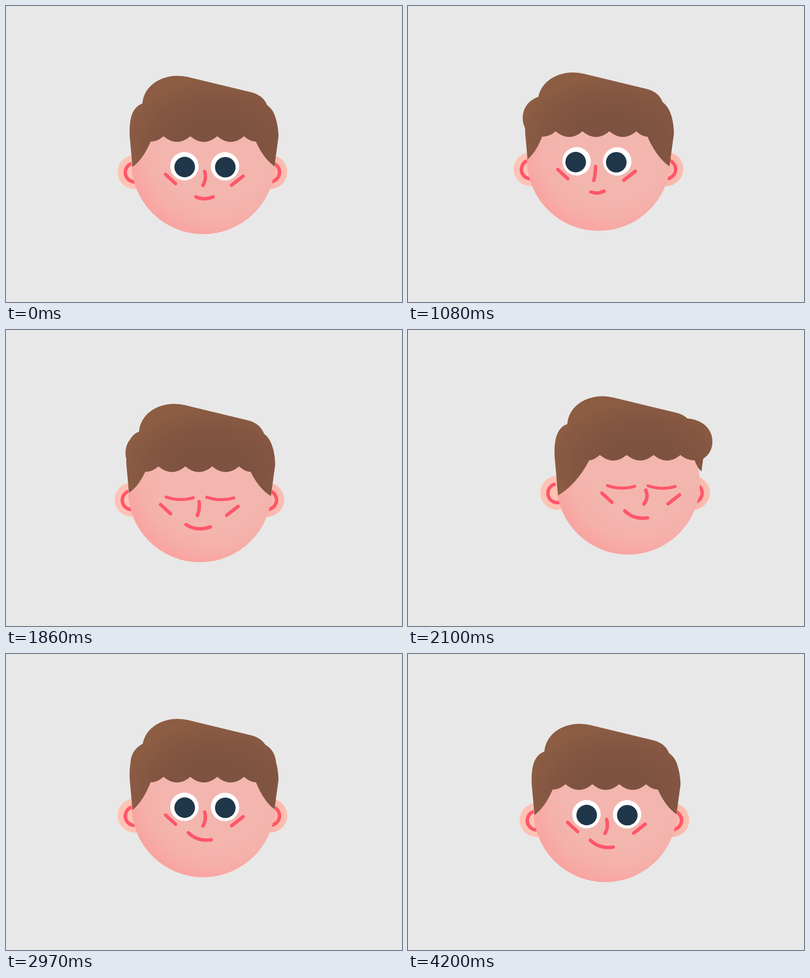
Animation of 800 by 600 pixels, one loop 4230 ms. Source, as an HTML page:

```html
<!DOCTYPE html>
<html lang="en">
<head>
<meta charset="utf-8">
<title>Head turn</title>
<style>
  html, body { margin: 0; width: 100%; height: 100%; overflow: hidden; background: #e8e8e8; }
  svg { display: block; width: 100vw; height: 100vh; }
  .line { fill: none; stroke: #ff566a; stroke-width: 7; stroke-linecap: round; stroke-linejoin: round; }
  .shut { stroke-width: 6; }
</style>
</head>
<body>
<svg viewBox="0 0 800 600">
  <defs>
    <radialGradient id="skin" gradientUnits="userSpaceOnUse" cx="425" cy="285" r="190">
      <stop offset=".55" stop-color="#f3b6af"/>
      <stop offset=".78" stop-color="#f5b0aa"/>
      <stop offset="1" stop-color="#faa29f"/>
    </radialGradient>
    <radialGradient id="brown" gradientUnits="userSpaceOnUse" cx="0" cy="0" r="1"
      gradientTransform="translate(425 275) scale(185 125)">
      <stop offset=".3" stop-color="#7d5241"/>
      <stop offset=".65" stop-color="#825542"/>
      <stop offset="1" stop-color="#8c5c43"/>
    </radialGradient>
    <linearGradient id="ear">
      <stop offset=".4" stop-color="#f7b2a9"/>
      <stop offset="1" stop-color="#fcc0b1"/>
    </linearGradient>
    <clipPath id="lids"><ellipse id="opening" rx="28.7"/></clipPath>
    <g id="eye">
      <g clip-path="url(#lids)">
        <circle r="30" fill="#fff"/>
        <circle id="pupil" cy="1.7" r="20.8" fill="#203649"/>
      </g>
      <path id="shut" class="line shut" d="M-27 1.5Q0 11 28 3"/>
    </g>
  </defs>

  <g id="ears">
    <circle cx="260" cy="336.5" r="34.5" fill="#fec3b4"/>
    <circle cx="533.7" cy="336.5" r="34.5" fill="url(#ear)"/>
    <path class="line" d="M253.7 319.5A19 19 0 0 0 265.2 355.7M541 319.5A19 19 0 0 1 534 356"/>
  </g>
  <g id="head">
    <circle cx="398.5" cy="317.5" r="145" fill="url(#skin)"/>
    <g fill="url(#brown)">
      <path id="hair"/>
      <path id="puffL"/>
      <path id="puffR"/>
    </g>
  </g>
  <g id="face">
    <use href="#eye" x="360.5" y="324.7"/>
    <use href="#eye" x="442.5" y="325"/>
    <path class="line" d="M322.5 341.5L342.5 360M456 363L479 345"/>
    <path id="nose" class="line"/>
    <path id="mouth" class="line"/>
    <ellipse id="round" class="line" cx="397.5" cy="387.5"/>
  </g>
</svg>
<script>
  const LOOP = 4230;
  const $ = id => document.getElementById(id);
  const set = (id, name, value) => $(id).setAttribute(name, value);
  const show = (id, on) => set(id, "visibility", on ? "visible" : "hidden");
  const clamp = (v, lo, hi) => Math.min(hi, Math.max(lo, v));

  // Eased 0 to 1 between two times, and there and back again.
  const step = (t, a, b) => (1 - Math.cos(Math.PI * clamp((t - a) / (b - a), 0, 1))) / 2;
  const dip = (t, a, mid, b) => step(t, a, mid) - step(t, mid, b);
  const blink = (t, close, open) => step(t, close, close + 120) - step(t, open, open + 120);

  const turn = t =>
    -54.5 * step(t, 940, 1370) + 103.5 * step(t, 1590, 2160) - 49 * step(t, 2387, 2817);

  // The head rests raised, a little less when turned, and dips with each move.
  const nod = (t, x) =>
    -10 * (step(t, 300, 740) - step(t, 3820, 4200)) + Math.abs(x) * .03 +
    20 * dip(t, 0, 300, 740) + 4 * dip(t, 940, 1155, 1370) +
    18.5 * dip(t, 1530, 1830, 2160) + 11.3 * dip(t, 2387, 2595, 2850) + 10 * dip(t, 3240, 3525, 3690);

  // The fringe and side puffs shift half as far again as the skull.
  const rider = (x, y) => (...v) => v.map((n, i) => n + (i % 2 ? y : x) / 2).join(" ");

  function hairPath(x, y) {
    const f = rider(x, y);
    const drop = s => s > 0 ? Math.min(s * .53, 16) : s * .67;
    const ly = 326.5 + drop(x), ry = 325 + drop(-x);
    const tipL = [250 + (ly - 265) * .09, ly], tipR = [550.5 - (ry - 265) * .135, ry];
    const endL = [292 + x * .6, 275 + y / 2], endR = [505 + x * .6, 275 + y / 2];
    const bend = (e, p) => [e[0] + (p[0] - e[0]) * .4, e[1] + (p[1] - e[1]) * .68];
    let scallops = `Q${f(493, 275, 481, 264)}`;
    for (let sx = 481; sx > 320; sx -= 54.3) scallops += `Q${f(sx - 27, 287, sx - 54.3, 264)}`;
    return `M${tipL}L250 265C248 228 256 204 275.5 198C278 165 308 141.5 347 141.5
      Q358 141.5 368 144L496 175Q520 181 528 202C542 212 550 235 550.5 265L${tipR}
      Q${bend(endR, tipR)} ${endR}${scallops}
      Q${f(306, 275)} ${endL}Q${bend(endL, tipL)} ${tipL}Z`;
  }

  function puffPath(x, y, mirrored) {
    const f = rider(x, y);
    const p = (...v) => f(...v.map((n, i) => mirrored && i % 2 === 0 ? 797 - n : n));
    return `M${p(288, 275)}C${p(268, 277, 251.5, 260, 251.5, 237)}
      C${p(251.5, 212, 270, 192, 304, 190)}L${p(310, 255)}Z`;
  }

  function drawEyes(t, x) {
    const open = 1 - blink(t, 90, 330) - blink(t, 1650, 2120) - blink(t, 3360, 3540);
    set("opening", "ry", 28.7 * open);
    set("pupil", "cx", .5 + x * .18);
    show("shut", open < .12);
  }

  function drawNose(x) {
    const nx = 401.5 + x * .2, curl = 5.5 + x * (x < 0 ? .33 : .06);
    set("nose", "d", `M${nx} 335.5Q${nx - 1.5 + curl} 351 ${nx - 3.5} 363.5`);
  }

  // A small smile puckers to a gasp, widens to a smile, then tilts to a smirk.
  function drawMouth(t) {
    const wide = step(t, 980, 1250), tilt = step(t, 1640, 2060);
    const pucker = 1 - .5 * (step(t, 0, 260) - wide);
    const cx = 401 + 5.5 * wide - 15 * tilt, cy = 387 - 3 * wide + .5 * tilt;
    const w = (17.3 + 9.2 * wide - 3.5 * tilt) * pucker;
    const rise = -3 * wide + 10 * tilt, sag = (7.5 + 6 * wide - 2.5 * tilt) * pucker;
    set("mouth", "d", `M${cx - w} ${cy - rise}Q${cx - 4.5 * tilt} ${cy + sag} ${cx + w} ${cy + rise}`);

    const gasp = step(t, 230, 420) - step(t, 860, 1000);
    show("mouth", gasp < .15);
    show("round", gasp >= .15);
    set("round", "rx", 13.2 * gasp);
    set("round", "ry", 13.2 * gasp);
  }

  function draw(t) {
    const x = turn(t), y = nod(t, x);
    const depth = { ears: .9, head: 1, face: 1.5 };
    for (const id in depth) set(id, "transform", `translate(${x * depth[id]} ${y * depth[id]})`);
    set("hair", "d", hairPath(x, y));
    set("puffL", "d", puffPath(x, y, false));
    set("puffR", "d", puffPath(x, y, true));
    drawEyes(t, x);
    drawNose(x);
    drawMouth(t);
  }

  const start = performance.now();
  function tick() {
    draw((performance.now() - start) % LOOP);
    requestAnimationFrame(tick);
  }
  tick();
</script>
</body>
</html>
```
